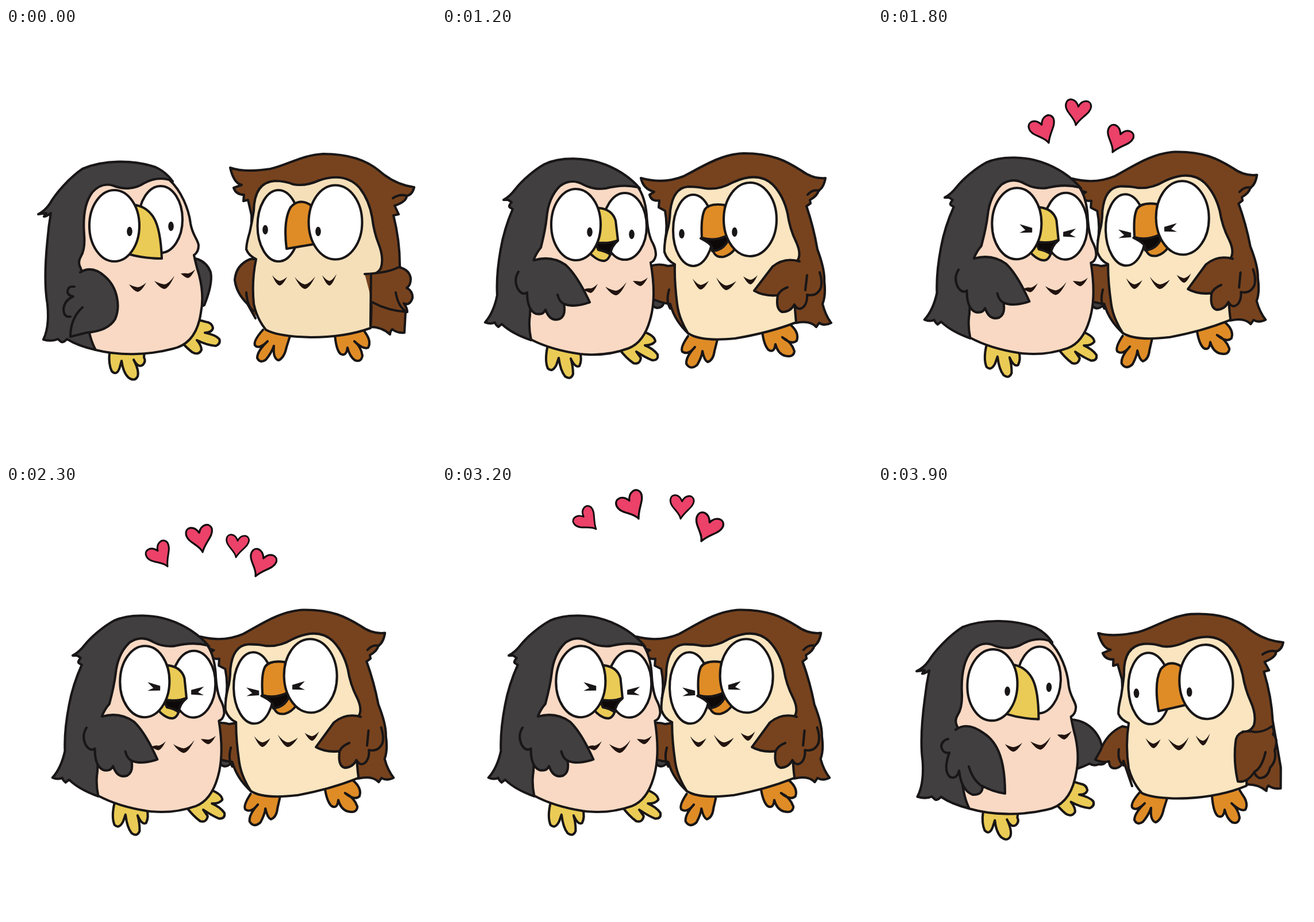
An HTML page for the animation above (4000 ms loop, 748 px wide and 748 px high).

```html
<!DOCTYPE html>
<html lang="en">
<head>
<meta charset="utf-8">
<title>Two owls</title>
<style>
html, body { margin: 0; width: 100%; height: 100%; overflow: hidden; background: #fff; }
svg { display: block; width: 100vw; height: 100vh; }
.ink { stroke: #191617; stroke-width: 4.1; stroke-linejoin: round; stroke-linecap: round; }
.line { fill: none; }
.mark { fill: #21130f; }
.heart { fill: #ec4169; stroke: #120c0e; stroke-width: 3.2; stroke-linejoin: round; }
.pose { visibility: hidden; animation: 4s step-end infinite; }
#pose0 { animation-name: rest; }
#pose1 { animation-name: reach; }
#pose2 { animation-name: lean; }
#pose3 { animation-name: hug; }
#pose4, #hearts { animation-name: squeeze; }
@keyframes rest { 0% { visibility: visible } 25%, 100% { visibility: hidden } }
@keyframes reach { 0% { visibility: hidden } 25% { visibility: visible } 27.5% { visibility: hidden } 97.5%, 100% { visibility: visible } }
@keyframes lean { 0% { visibility: hidden } 27.5% { visibility: visible } 30% { visibility: hidden } 95% { visibility: visible } 97.5%, 100% { visibility: hidden } }
@keyframes hug { 0% { visibility: hidden } 30% { visibility: visible } 32.5% { visibility: hidden } 92.5% { visibility: visible } 95%, 100% { visibility: hidden } }
@keyframes squeeze { 0% { visibility: hidden } 32.5% { visibility: visible } 92.5%, 100% { visibility: hidden } }
.rise { opacity: 0; animation: rise .4s step-end infinite; }
@keyframes rise { 0% { opacity: 1 } 25%, 100% { opacity: 0 } }
</style>
</head>
<body>
<svg id="stage" viewBox="0 0 748 748"></svg>
<script>
const black = { hair: '#413f40', skin: '#f9d9c3', bill: '#eacb55' };
const brown = { hair: '#77431e', skin: '#fae5c0', bill: '#df8c26' };

const leftCalm = { ...black,
  feet: ['M180 565Q178 585 184 597Q193 606 198 590L201 579Q204 600 213 608Q224 616 229 606Q232 596 222 577Q230 592 238 586Q244 580 240 573L241 562',
    'M305 546Q316 558 324 564Q335 570 340 560Q340 552 332 543Q350 552 365 553Q374 549 371 541Q365 534 346 530Q358 530 360 522Q358 512 347 511L336 508'],
  body: 'M56 324Q68 318 76 306C85 290 108 262 133 245C170 229 222 229 260 242Q278 250 290 267L200 400L156 560Q125 553 106 541Q100 548 96 546L90 541Q80 546 65 542Q76 520 72 480Q65 440 72 370Q74 345 78 322Q70 328 66 328L70 322Z',
  face: 'M284 264C305 283 318 315 321 340C324 360 334 368 335 378Q335 390 327 395Q330 410 336 430Q345 465 339 495C334 530 318 552 290 558C245 570 195 570 156 560Q142 535 140 490Q140 440 130 418Q124 408 130 398Q138 385 136 360Q132 310 150 286Q166 268 186 274C205 282 225 280 240 270Q262 258 284 264Z',
  eyes: [[269, 333, 38, 58], [188.5, 344, 43.5, 62]],
  pupils: [[287, 345], [215, 354]],
  beak: 'M226 308Q246 312 257 330Q269 350 271 401Q240 401 212 393Z',
  marks: [[214, 446, 244, 443, 458], [258, 440, 293, 431, 453], [304, 427, 329, 420, 434]]
};

const leftHappy = { ...black,
  feet: ['M184 552Q178 578 184 592Q192 600 199 586L203 574Q206 596 214 606Q224 613 228 602Q228 588 224 575Q232 592 239 588Q244 578 240 564',
    'M308 558Q320 574 333 583Q344 586 346 574L338 563Q355 574 366 578Q377 578 375 568Q368 558 353 552Q366 552 371 545Q370 535 350 528'],
  body: 'M107 299Q118 293 127 281C140 264 162 246 178 237C205 224 250 224 285 238Q322 253 344 279L240 400L155 543Q122 532 104 515L98 520Q93 516 92 512Q85 516 75 512Q90 495 96 465Q94 430 102 385Q108 350 123 315L118 312Q115 310 121 303L115 299Z',
  face: 'M341 277Q353 294 356 325Q358 360 367 375Q372 385 372 395Q370 406 363 408Q372 460 365 495Q355 545 325 557Q285 572 240 567Q190 560 155 542Q150 520 153 500Q155 440 160 402Q165 390 172 382Q180 350 182 330Q185 295 205 275Q225 260 247 273Q265 282 285 279Q315 271 341 277Z',
  eyes: [[318, 345, 38, 58], [233, 342, 43, 62]],
  pupils: [[330, 359], [257, 355]],
  squints: [[325, 358, -1], [249, 352, 1]],
  low: 'M252 384C260 398 274 406 283 405Q290 403 293 393Q282 380 270 374Z',
  mouth: 'M266 371L306 370Q294 380 293 394Q284 388 272 386Z',
  beak: 'M272 313Q296 315 302 335L306 369Q292 376 266 373Z',
  marks: [[246, 455, 271, 445, 460], [284, 450, 321, 442, 464], [332, 440, 358, 434, 448]]
};

const rightCalm = { ...brown,
  feet: ['M447 525Q430 544 433 552Q440 560 455 545Q437 562 437 574Q442 584 452 577Q462 565 466 553Q464 575 474 578Q484 574 488 555L494 536',
    'M572 532Q574 560 582 567Q592 572 594 556Q598 572 607 578Q618 582 620 570Q618 555 606 545Q622 560 630 556Q636 545 625 530L620 522'],
  body: 'M390 243Q415 252 460 245C490 238 515 221 552 219C600 219 630 232 650 249Q676 272 710 277Q707 290 697 292Q697 302 676 309L683 324L674 326Q685 370 685 412L695 494L693 530Q680 531 672 524Q668 528 668 533Q654 520 634 520L480 500Q440 400 422 380Q428 345 427 325L421 299L413 301L414 290Q400 290 396 278L410 273Q396 270 390 243Z',
  tuft: 'M673 296Q685 288 697 292',
  face: 'M431 318Q432 268 468 266Q485 266 500 272Q520 276 545 265Q590 250 615 278Q632 300 637 330Q640 355 648 375Q658 400 652 418Q645 430 632 428Q638 475 634 522Q590 538 530 538Q475 537 452 525Q436 505 431 480Q427 440 435 402Q422 396 418 385Q418 375 424 355Q428 338 431 318Z',
  eyes: [[474, 344, 36.5, 62], [573, 338, 46.5, 64.5]],
  pupils: [[451, 351], [543, 354]],
  beak: 'M488 384Q482 335 495 312Q510 295 530 308L536 376Z',
  marks: [[463, 430, 489, 433, 447], [502, 433, 538, 432, 453], [550, 430, 575, 428, 447]]
};

const rightHappy = { ...brown,
  feet: ['M428 536Q414 556 418 563Q428 570 440 555Q424 572 425 584Q432 596 444 586Q452 572 453 562Q456 578 462 581Q472 578 474 562L480 538',
    'M557 528Q560 552 568 560Q578 566 580 550Q584 566 596 570Q612 574 613 562Q608 546 592 538Q608 552 617 544Q622 530 606 516'],
  body: 'M346 261Q385 272 420 258C450 243 485 219 525 218C575 218 600 232 625 248Q645 263 667 261Q664 278 655 283Q653 292 640 299L641 305L634 310Q646 345 653 385Q666 420 665 440Q668 465 662 480Q667 500 677 513Q665 519 656 513L651 520Q640 508 616 513L450 500Q400 400 388 370Q393 345 388 318L377 312L378 300Q364 302 361 290L369 285Q350 280 346 261Z',
  tuft: 'M636 290Q645 280 656 283',
  face: 'M397 318Q402 278 428 276Q445 276 458 279Q482 282 505 269Q550 248 576 273Q594 292 601 322Q605 350 616 372Q626 394 618 405Q610 460 616 512Q570 530 510 540Q450 546 428 531Q412 505 409 480Q404 440 405 411Q392 405 387 390Q386 375 392 352Q396 340 397 318Z',
  eyes: [[437, 352, 35, 62], [536, 333, 46, 64]],
  pupils: [[417, 358], [509, 355]],
  squints: [[435, 360, 1], [515, 351, -1]],
  low: 'M470 384C474 398 482 399 490 398Q502 395 510 384L500 360Z',
  mouth: 'M450 366L502 358Q494 387 470 388Q474 378 450 366Z',
  beak: 'M452 365Q450 330 457 316Q465 304 492 308L498 360Q475 372 452 365Z',
  marks: [[436, 436, 464, 440, 454], [477, 434, 512, 440, 455], [524, 432, 549, 430, 445]]
};

// Each wing set: far wing, near wing, feather lines on the near wing.
const wings = {
  leftRest: { far: 'M325 400L333 402Q350 408 356 425Q360 445 345 482L325 490',
    near: 'M129 425Q150 412 172 432C195 452 199 485 190 506Q178 527 140 530L112 537Q112 505 133 486',
    lines: 'M119 450Q107 448 107 460Q109 466 117 467Q101 474 100 490Q101 504 112 502' },
  leftReach: { far: 'M325 405L343 407Q372 412 386 441L397 476Q396 486 384 484Q376 488 368 483Q358 488 346 492L325 492',
    near: 'M135 424Q155 409 184 430C210 447 221 480 221 535Q200 532 182 522Q182 538 165 537Q145 530 141 495Q137 511 125 506Q113 495 124 464Q112 466 110 452Q112 442 122 440',
    lines: 'M158 488Q165 512 182 523' },
  leftHug: { far: 'M362 440L386 470Q388 486 374 487Q362 484 362 470',
    near: 'M160 404Q190 395 215 412Q235 430 257 477Q230 487 212 480Q216 500 205 506Q188 512 180 490Q176 500 163 497Q148 490 148 460Q140 466 132 454Q124 438 133 424',
    lines: 'M201 464Q204 476 212 480' },
  rightRest: { far: 'M434 505L420 480Q400 460 398 438Q400 412 425 402L440 402',
    near: 'M624 428Q665 426 683 416Q702 420 704 436Q704 448 697 452Q708 458 707 470Q702 484 692 479Q698 487 698 494Q665 492 637 477',
    lines: 'M678 460Q682 485 697 494M635 428L634 518M418 460Q420 485 430 492' },
  rightReach: { far: 'M442 522L427 478Q424 489 414 491Q402 492 402 479Q390 482 378 476L387 460Q398 430 425 418L434 420',
    near: 'M656 428Q672 428 685 418Q691 425 687 432Q697 440 690 460Q694 478 682 490Q678 508 664 508Q656 505 655 497Q642 517 626 514Q618 480 622 445Q624 422 656 428',
    lines: 'M674 463Q668 490 655 497M419 458Q416 478 427 486' },
  rightHug: { far: 'M428 531Q404 508 397 480Q380 478 363 470L363 414Q378 409 393 414L408 412',
    near: 'M622 406Q596 398 575 415L543 457Q560 467 584 465Q580 490 592 494Q606 494 613 481Q620 494 630 484Q636 476 635 464Q652 468 659 452Q662 440 657 425',
    lines: 'M601 451Q588 456 584 465M635 430L632 456M395 455Q389 475 397 488' }
};

const path = (d, fill) => `<path class="ink" d="${d}" fill="${fill}"/>`;
const line = d => d ? `<path class="ink line" d="${d}"/>` : '';
const group = (m, inner) => m ? `<g transform="matrix(${m})">${inner}</g>` : `<g>${inner}</g>`;
const eye = ([x, y, rx, ry]) => `<ellipse class="ink" cx="${x}" cy="${y}" rx="${rx}" ry="${ry}" fill="#fff"/>`;
const pupil = ([x, y]) => `<ellipse cx="${x}" cy="${y}" rx="4.8" ry="8.2" fill="#191617"/>`;
const squint = ([x, y, dir]) =>
  `<path transform="translate(${x} ${y}) scale(${dir} 1)" d="M-11 -9L11 -3V5L-11 6L-1 1Z" fill="#191617"/>`;

// A pointed chest feather: sharp tips, thick at the bottom.
function mark([x1, y1, x2, y2, bottom]) {
  const x = (x1 + x2) / 2, w = (x2 - x1) * .28, inner = bottom - 7;
  return `<path class="mark" d="M${x1} ${y1}Q${x1 + w} ${inner - 1} ${x} ${inner}Q${x2 - w} ${inner - 1} ${x2} ${y2}` +
    `Q${x2 - w} ${bottom} ${x} ${bottom + 1}Q${x1 + w} ${bottom} ${x1} ${y1}"/>`;
}

function owl(o, wing, { m, feetM = m, shut, far } = {}) {
  const feet = o.feet.map(d => path(d, o.bill)).join('');
  const beak = (o.low ? path(o.low, o.bill) + path(o.mouth, '#0d0909') : '') + path(o.beak, o.bill);
  const body = path(o.body, o.hair) + line(o.tuft) + path(o.face, o.skin) + o.marks.map(mark).join('') +
    eye(o.eyes[0]) + beak + eye(o.eyes[1]) +
    (shut ? o.squints.map(squint) : o.pupils.map(pupil)).join('');
  return group(feetM, feet) + (far ? path(wing.far, o.hair) : '') + group(m, body) +
    path(wing.near, o.hair) + line(wing.lines);
}

// The black owl stands in front, but its far wing reaches behind the brown one.
function pair(l, lw, lo, r, rw, ro, ml, mr) {
  return group(ml, path(lw.far, l.hair)) +
    group(mr, owl(r, rw, { ...ro, far: true })) +
    group(ml, owl(l, lw, lo));
}

const w = wings;
const leftTip = { m: '1 .03 -.035 1 22.5 -3.5' };
const rightTip = { m: '1 -.056 .05 1 -19 34.8', feetM: '1 0 0 1 9 7' };
const reach = [leftCalm, w.leftReach, leftTip, rightCalm, w.rightReach, rightTip];
const hug = shut => [leftHappy, w.leftHug, { shut }, rightHappy, w.rightHug, { shut }];
const poses = [
  pair(leftCalm, w.leftRest, {}, { ...rightCalm, skin: '#f5dfb9' }, w.rightRest, {}),
  pair(...reach),
  pair(...reach, '1 .05 -.06 1 37 -13', '1 -.025 .03 1 -27 12.6'),
  pair(...hug(false)),
  pair(...hug(true), '1 .018 -.015 1 13.5 -6', '1 -.02 .02 1 -13 8')
];

// Heart tips per step: x, y, angle, scale.
const rise = [
  [[320, 239, -14, .9], [364, 218, 8, .9]],
  [[297, 200, -21, 1], [344, 169, 8, .96], [408, 216, 24, 1]],
  [[281, 140, -32, .95], [342, 115, -10, 1], [400, 124, 6, .85], [434, 157, 24, 1]],
  [[268, 75, -45, .9], [342, 57, -27, 1.04], [415, 57, 5, .89], [451, 96, 24, 1.05]]
];
const heart = ([x, y, turn, size]) =>
  `<path class="heart" transform="translate(${x} ${y}) rotate(${turn}) scale(${size})" d="M0 0C-3 -14 -24 -21 -23 -36C-22 -48 -7 -49 0 -34C5 -48 21 -50 23 -37C23 -24 8 -17 0 0Z"/>`;

document.getElementById('stage').innerHTML =
  poses.map((p, i) => `<g class="pose" id="pose${i}">${p}</g>`).join('') +
  `<g class="pose" id="hearts">${rise.map((set, i) =>
    `<g class="rise" style="animation-delay:${(i - 3) * 100}ms">${set.map(heart).join('')}</g>`).join('')}</g>`;
</script>
</body>
</html>
```
